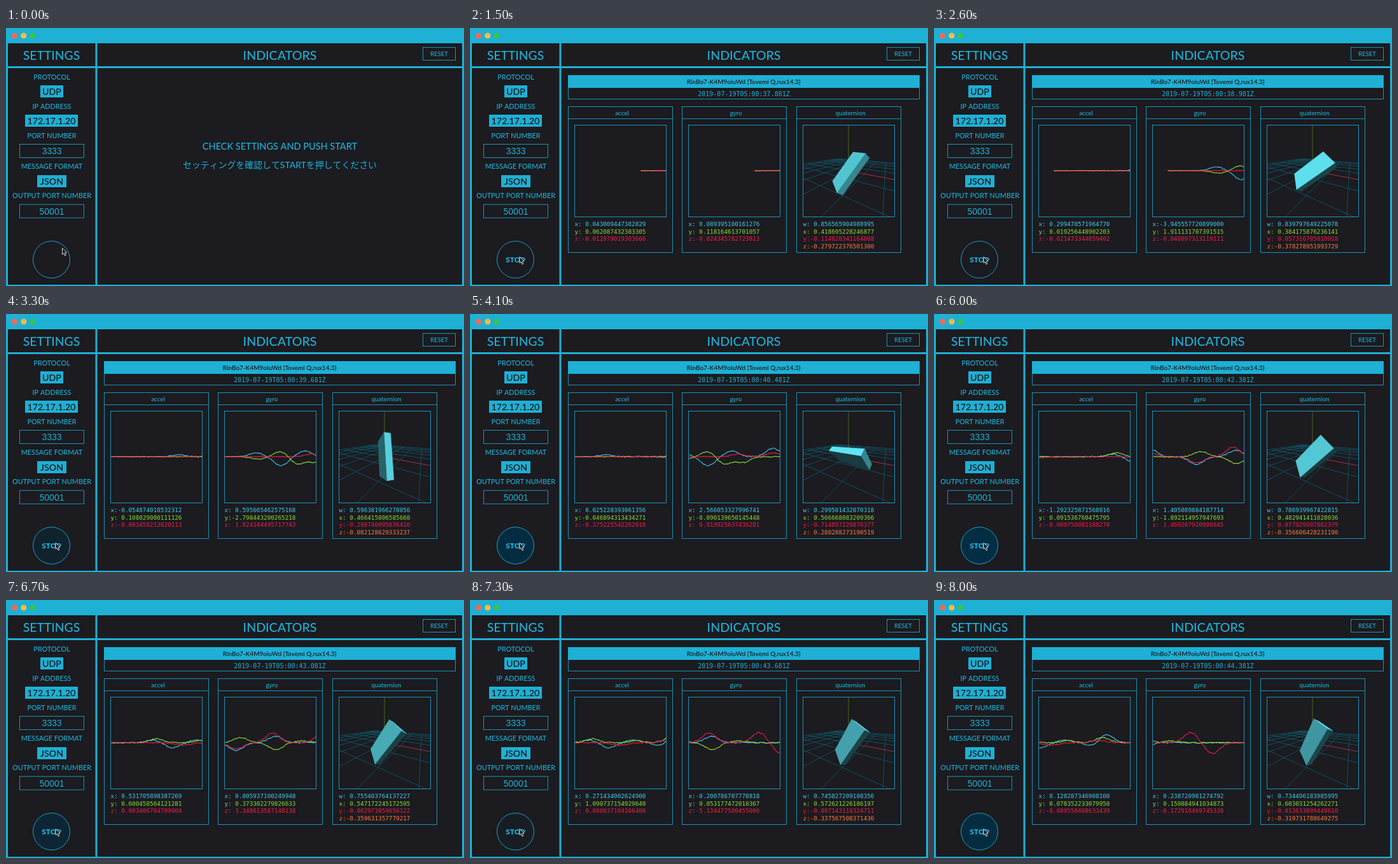
These frames come from a looping animation (720x405 px, 8100 ms). An HTML page with a canvas:

```html
<!DOCTYPE html>
<html lang="en">
<head>
<meta charset="utf-8">
<title>Sensor indicators</title>
<style>
html, body { margin: 0; width: 100%; height: 100%; overflow: hidden; background: #1b1b20; }
canvas { display: block; width: 720px; height: 405px; }
</style>
</head>
<body>
<canvas id="stage"></canvas>
<script>
const canvas = document.getElementById('stage');
const ctx = canvas.getContext('2d');
const dpr = window.devicePixelRatio || 1;
canvas.width = 720 * dpr;
canvas.height = 405 * dpr;

const LOOP = 8100, STEP = 100;
const CLICK = 0.3, DATA_START = 0.9, TRACE_START = 0.95;
const SPEED = 72.7, RATE = 60;

const BG = '#1b1b20', CYAN = '#1eb0d5';
const SKY = '#42cbee', GREEN = '#90de30', RED = '#f81a47', ORANGE = '#ff7a3e';
const SANS = 'Lato, "Noto Sans CJK JP", "Noto Sans CJK", sans-serif';
const ARIAL = '"Liberation Sans", Arial, sans-serif';
const MONO = '"DejaVu Sans Mono", monospace';

// Phone poses: time, then quaternion w x y z
const POSES = [
  [1.5, 0.856, 0.418, -0.114, -0.279],
  [2.6, 0.839, 0.384, 0.057, -0.378],
  [4.1, 0.299, 0.566, -0.714, 0.280],
  [5.2, 0.825, 0.404, 0.175, -0.352],
  [6.7, 0.755, 0.547, -0.002, -0.359],
  [8.0, 0.734, 0.603, -0.013, -0.310]
];

// Swings of each sensor: [time, height in pixels]
const SENSORS = {
  accel: { scale: 6, swings: [
    [[2.8, 3], [5.65, 4], [6.05, -8], [6.6, 4], [7.2, -5], [7.48, 13]],
    [[5.7, 6], [6.65, 3], [7.4, 8]],
    [[4.1, -1.5], [6.3, -4], [7.3, 4]]
  ] },
  gyro: { scale: 3.1, swings: [
    [[2, 6], [2.54, -14], [3.05, 9], [3.95, 13], [4.97, -12], [5.82, 10]],
    [[2.05, -4], [2.54, 8], [2.9, -12], [3.3, -9], [5.06, 8], [5.83, -11], [6.4, 3]],
    [[3.2, 4], [3.95, 6], [4.97, -10], [5.76, 15], [6.84, 16], [7.32, -17]]
  ] }
};
const SWING = 0.21;

const mix = (a, b, k) => a + (b - a) * k;
const ease = k => k * k * (3 - 2 * k);

function random(n, seed) {
  const s = Math.sin(n * 12.9898 + seed * 78.233) * 43758.5453;
  return s - Math.floor(s);
}

// Height of a trace in pixels: soft swings plus sensor noise that grows with handling
function signal(swings, seed, t) {
  const wave = swings.reduce((sum, [c, h]) => sum + h * Math.exp(-(((t - c) / SWING) ** 2)), 0);
  const noise = (random(Math.floor(t * RATE / 2 + 0.01), seed) - 0.5) * Math.min(1.6, 0.3 + t * 0.35);
  return wave + noise;
}

function poseAt(t) {
  const i = POSES.findIndex(p => p[0] >= t);
  const b = POSES[i], a = POSES[Math.max(0, i - 1)];
  const k = a === b ? 0 : ease((t - a[0]) / (b[0] - a[0]));
  return a.slice(1).map((v, n) => mix(v, b[n + 1], k));
}

function text(str, x, cy, size, { color = CYAN, font = SANS, weight = 500, align = 'center' } = {}) {
  ctx.font = `${weight} ${size}px ${font}`;
  ctx.fillStyle = color;
  ctx.textAlign = align;
  ctx.fillText(str, x, cy + size * 0.36);
}

function fill(x, y, w, h, color = CYAN) {
  ctx.fillStyle = color;
  ctx.fillRect(x, y, w, h);
}

function frame(x, y, w, h) {
  ctx.strokeStyle = CYAN;
  ctx.lineWidth = 0.8;
  ctx.strokeRect(x, y, w, h);
}

function line(a, b, color, width = 0.8) {
  ctx.strokeStyle = color;
  ctx.lineWidth = width;
  ctx.beginPath();
  ctx.moveTo(a[0], a[1]);
  ctx.lineTo(b[0], b[1]);
  ctx.stroke();
}

function polygon(pts) {
  ctx.beginPath();
  pts.forEach(p => ctx.lineTo(p[0], p[1]));
  ctx.closePath();
}

function disc(x, y, r, color) {
  ctx.fillStyle = color;
  ctx.beginPath();
  ctx.arc(x, y, r, 0, Math.PI * 2);
  ctx.fill();
}

function drawShell() {
  fill(0, 0, 720, 405, BG);
  fill(0, 0, 720, 24);
  fill(0, 24, 3, 381);
  fill(717, 24, 3, 381);
  fill(0, 403, 720, 2);
  fill(0, 60, 720, 3);
  fill(140.5, 24, 3, 381);
  ['#ef6a5c', '#f3bd45', '#36c553'].forEach((c, i) => disc(13.5 + i * 14.3, 12, 4.6, c));
  text('SETTINGS', 71.5, 43, 19.3);
  text('INDICATORS', 430.5, 43, 19.6);
  frame(655.5, 30.5, 51, 20);
  text('RESET', 681, 40.5, 9.5);
}

function drawSettings() {
  const label = (s, y) => text(s, 72, y, 10.8);
  const chip = (s, y, x, w) => {
    fill(x, y, w, 19);
    text(s, x + w / 2, y + 9.7, 14.2, { color: BG, weight: 600 });
  };
  const field = (s, y) => {
    frame(21.5, y, 101, 21);
    text(s, 72, y + 10.5, 14, { font: ARIAL, weight: 400 });
  };
  label('PROTOCOL', 77);
  chip('UDP', 90, 54, 36);
  label('IP ADDRESS', 123);
  chip('172.17.1.20', 136, 30, 83);
  label('PORT NUMBER', 169);
  field('3333', 182.5);
  label('MESSAGE FORMAT', 217.5);
  chip('JSON', 231, 49, 46);
  label('OUTPUT PORT NUMBER', 263.5);
  field('50001', 277);
}

function drawButton(t) {
  if (t >= 0.5) {
    ctx.globalAlpha = 0.5 + 0.5 * Math.cos((t - 0.1) / 0.975 * Math.PI * 2);
    disc(71.5, 363.5, 29, '#022e44');
    ctx.globalAlpha = 1;
  }
  ctx.strokeStyle = CYAN;
  ctx.lineWidth = 0.9;
  ctx.beginPath();
  ctx.arc(71.5, 363.5, 29, 0, Math.PI * 2);
  ctx.stroke();
  if (t >= CLICK) text('STOP', 71.5, 363.5, 11.7, { weight: 900 });
}

function drawCursor(t) {
  const k = ease(Math.min(1, t / CLICK));
  const x = mix(88.5, 78, k), y = mix(345.5, 359, k);
  polygon([[0, 0], [0, 10], [2.3, 8], [4, 12], [5.8, 11.2], [4.1, 7.4], [7, 7.2]].map(p => [p[0] + x, p[1] + y]));
  ctx.fillStyle = '#15151a';
  ctx.fill();
  ctx.strokeStyle = '#e4e8ea';
  ctx.lineWidth = 0.9;
  ctx.stroke();
}

// Readings show 15 decimals; the fine ones are random
function reading(v, seed) {
  const tail = random(seed, 7) * 1e-3;
  return (v < 0 ? '' : ' ') + (v + (v < 0 ? -tail : tail)).toFixed(15);
}

function drawPanel(x, title, names, values, t) {
  frame(x, 123.5, 164, 229);
  line([x, 142.5], [x + 164, 142.5], CYAN);
  text(title, x + 84.5, 133.5, 9.8);
  const colors = [SKY, GREEN, RED, ORANGE];
  values.forEach((v, i) => {
    const style = { color: colors[i], font: MONO, weight: 400, align: 'left' };
    text(names[i] + ':' + reading(v, t * 10 + i), x + 10, 308 + i * 11.5, 9.3, style);
  });
}

function clipBox(x, draw) {
  ctx.save();
  ctx.beginPath();
  ctx.rect(x, 152.5, 144, 144);
  ctx.clip();
  draw();
  ctx.restore();
  frame(x, 152.5, 144, 144);
}

function drawTraces(x, swings, t) {
  const from = Math.ceil(Math.max(TRACE_START, t - 144 / SPEED) * RATE);
  const to = Math.floor(t * RATE + 0.001);
  [SKY, GREEN, RED].forEach((color, n) => {
    ctx.strokeStyle = color;
    ctx.lineWidth = 1.1;
    ctx.lineJoin = 'round';
    ctx.beginPath();
    for (let i = from; i <= to; i++) {
      const at = i / RATE;
      ctx.lineTo(x + 144 - (t - at) * SPEED, 224 - signal(swings[n], n + 1, at));
    }
    ctx.stroke();
  });
}

function drawSensor(x, title, t) {
  const { scale, swings } = SENSORS[title];
  drawPanel(x, title, 'xyz', swings.map((s, n) => signal(s, n + 1, t) / scale), t);
  clipBox(x + 10, () => drawTraces(x + 10, swings, t));
}

// Wide-angle camera looking at the middle of the floor
const YAW = 31 * Math.PI / 180, PITCH = 18 * Math.PI / 180;
const DIST = 3.8, FOCAL = 94, NEAR = 0.1, FLOOR = 5;
const [sy, cy, sp, cp] = [Math.sin(YAW), Math.cos(YAW), Math.sin(PITCH), Math.cos(PITCH)];
const LIGHT = [0.25, 0.9, 0.36];
const HALF = [0.68, 1.27, 0.2];

const toward = ([x, y, z]) => x * sy * cp + y * sp + z * cy * cp;
const depth = p => DIST - toward(p);

function project(p) {
  const [x, y, z] = p, k = FOCAL / depth(p);
  return [595 + k * (x * cy - z * sy), 224.5 - k * (-x * sy * sp + y * cp - z * cy * sp)];
}

// Lines here always start in front of the camera or are cut at the near plane
function line3(a, b, color) {
  const cut = (p, q) => {
    const d = depth(p);
    if (d >= NEAR) return p;
    const k = (NEAR - d) / (depth(q) - d);
    return p.map((v, i) => mix(v, q[i], k));
  };
  if (depth(a) < NEAR && depth(b) < NEAR) return;
  line(project(cut(a, b)), project(cut(b, a)), color);
}

// Sensor space has z up, the scene has y up
function axes(q) {
  const len = Math.hypot(...q);
  const [w, x, y, z] = q.map(v => v / len);
  return [
    [1 - 2 * (y * y + z * z), 2 * (x * y + w * z), 2 * (x * z - w * y)],
    [2 * (x * y - w * z), 1 - 2 * (x * x + z * z), 2 * (y * z + w * x)],
    [2 * (x * z + w * y), 2 * (y * z - w * x), 1 - 2 * (x * x + y * y)]
  ].map(([a, b, c]) => [a, c, -b]);
}

function drawBody(q) {
  const dirs = axes(q);
  const corner = s => [0, 1, 2].map(i => dirs.reduce((sum, d, k) => sum + d[i] * HALF[k] * s[k], 0));
  for (let a = 0; a < 3; a++) {
    for (const side of [-1, 1]) {
      const b = (a + 1) % 3, c = (a + 2) % 3;
      const n = dirs[a].map(v => v * side);
      if (DIST * toward(n) <= HALF[a]) continue;
      const pts = [[-1, -1], [1, -1], [1, 1], [-1, 1]].map(([u, v]) => {
        const s = [];
        s[a] = side; s[b] = u; s[c] = v;
        return project(corner(s));
      });
      const lit = Math.max(0, n.reduce((sum, v, i) => sum + v * LIGHT[i], 0));
      const k = Math.min(1, 0.25 + 0.85 * lit);
      ctx.fillStyle = ctx.strokeStyle = `rgb(${98 * k}, ${234 * k}, ${250 * k})`;
      ctx.lineWidth = 0.4;
      polygon(pts);
      ctx.fill();
      ctx.stroke();
    }
  }
}

function drawScene(q) {
  for (let i = -FLOOR; i <= FLOOR; i++) {
    line3([i, 0, -FLOOR], [i, 0, FLOOR], '#0f5d70');
    line3([-FLOOR, 0, i], [FLOOR, 0, i], '#0f5d70');
  }
  line3([0, 0, 0], [FLOOR, 0, 0], '#d8142f');
  line3([0, 0, 0], [0, FLOOR, 0], '#5c7a1a');
  drawBody(q);
}

function drawData(t) {
  fill(154, 74, 552.5, 20);
  frame(154.5, 74.5, 552, 37);
  text('RinBo7-K4M9oluWd (Tovemi Q,rux14.3)', 430, 84, 10, { color: BG, weight: 600 });
  const stamp = new Date(Date.UTC(2019, 6, 19, 5, 0, 36, 381) + Math.round(t * 1000)).toISOString();
  text(stamp, 430.5, 103.5, 10, { font: MONO, weight: 400 });

  drawSensor(154.5, 'accel', t);
  drawSensor(333.5, 'gyro', t);
  const q = poseAt(t);
  drawPanel(513.5, 'quaternion', 'wxyz', q, t);
  clipBox(523.5, () => drawScene(q));
}

function drawPrompt() {
  text('CHECK SETTINGS AND PUSH START', 430.5, 186, 14.5);
  text('セッティングを確認してSTARTを押してください', 430.5, 215, 13.9);
}

function render(now) {
  const t = Math.floor((now % LOOP) / STEP) * STEP / 1000;
  ctx.setTransform(dpr, 0, 0, dpr, 0, 0);
  drawShell();
  drawSettings();
  drawButton(t);
  if (t < CLICK) drawPrompt();
  if (t >= DATA_START) drawData(t);
  drawCursor(t);
}

let start = null;
function tick(now) {
  if (start === null) start = now;
  render(now - start);
  requestAnimationFrame(tick);
}
render(0);
requestAnimationFrame(tick);
</script>
</body>
</html>
```
